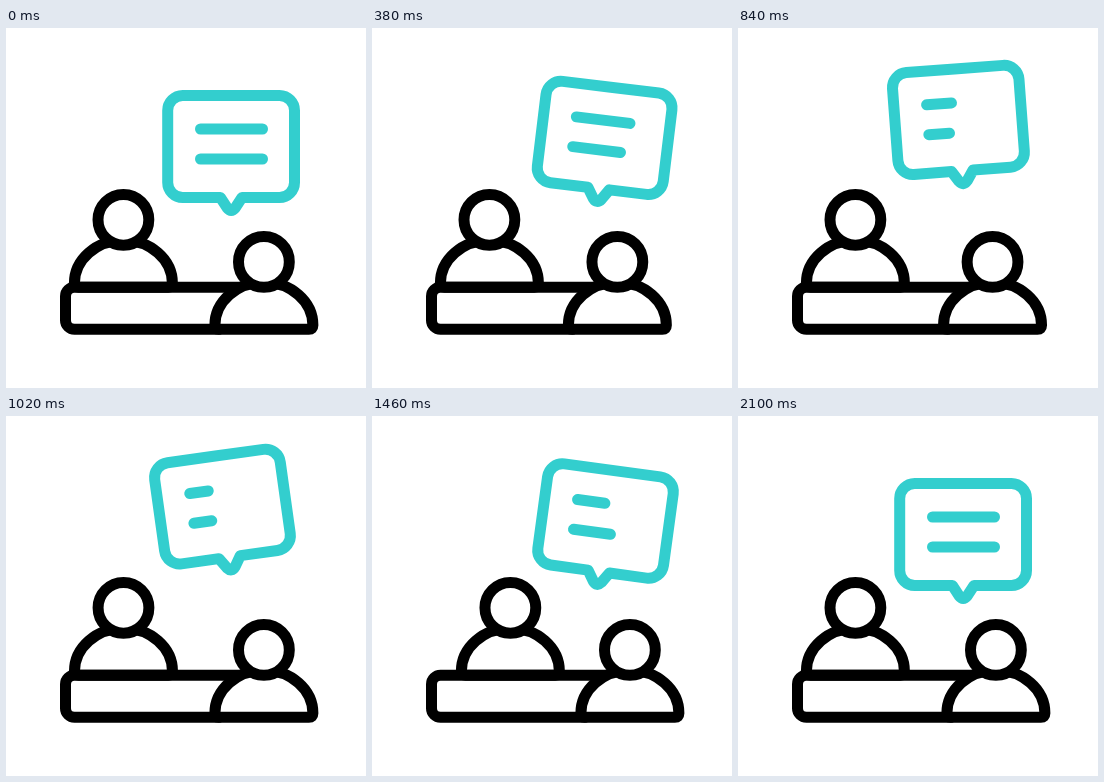
An HTML page with a canvas that plays this animation: 360 by 360 pixels, repeating every 2.52 s.

```html
<!DOCTYPE html>
<html lang="en">
<head>
<meta charset="utf-8">
<title>Conversation</title>
<style>
html, body { margin: 0; width: 100%; height: 100%; overflow: hidden; background: #fff; }
canvas { display: block; width: 360px; height: 360px; }
</style>
</head>
<body>
<canvas id="stage"></canvas>
<script>
const LOOP = 2520, STEP = 20;
const INK = '#000', TEAL = '#33cece';
const canvas = document.getElementById('stage');
const ctx = canvas.getContext('2d');
const scale = window.devicePixelRatio || 1;
canvas.width = canvas.height = 360 * scale;

// Cosine ease from 0 to 1 between a and b; skew > 0 runs ahead, < 0 lags
function ease(t, a, b, skew = 0) {
  const q = Math.min(1, Math.max(0, (t - a) / (b - a)));
  const u = q + skew * q * (1 - q);
  return (1 - Math.cos(Math.PI * u)) / 2;
}

// There and back again
const slide = (t, a, b) => ease(t, a, (a + b) / 2) - ease(t, (a + b) / 2, b);

function stroke(color) {
  ctx.strokeStyle = color;
  ctx.stroke();
}

function person(x, base) {
  ctx.fillStyle = '#fff';
  ctx.beginPath();
  ctx.ellipse(x, base - 4, 49, 43, 0, Math.PI, Math.PI * 2);
  ctx.quadraticCurveTo(x + 49, base, x + 45, base);
  ctx.lineTo(x - 45, base);
  ctx.quadraticCurveTo(x - 49, base, x - 49, base - 4);
  ctx.closePath();
  ctx.fill();
  stroke(INK);
  ctx.beginPath();
  ctx.arc(x, base - 67.4, 25.4, 0, Math.PI * 2);
  ctx.fill();
  stroke(INK);
}

function desk(right) {
  ctx.beginPath();
  ctx.moveTo(right - 24, 259.3);
  ctx.arcTo(59.5, 259.3, 59.5, 301.3, 9);
  ctx.arcTo(59.5, 301.3, right, 301.3, 9);
  ctx.lineTo(right - 45, 301.3);
  stroke(INK);
}

function textLine(y, length) {
  ctx.beginPath();
  ctx.moveTo(194.5, y);
  ctx.lineTo(194.5 + length, y);
  stroke(TEAL);
}

function bubble(t) {
  const lift = 28.5 * (ease(t, 0, 1000) - ease(t, 1000, 2000, 0.18));
  const tilt = 8 * ease(t, 0, 500) - 16 * ease(t, 500, 1000)
    + 16 * ease(t, 1000, 1500) - 8 * ease(t, 1500, 2000);
  ctx.save();
  ctx.translate(225.2, 181 - lift);
  ctx.rotate(tilt * Math.PI / 180);
  ctx.translate(-225.2, -181);

  ctx.beginPath();
  ctx.moveTo(225, 67.4);
  ctx.arcTo(288.5, 67.4, 288.5, 169.5, 15);
  ctx.arcTo(288.5, 169.5, 236, 169.5, 15);
  ctx.lineTo(236, 169.5);
  ctx.lineTo(229.3, 179.8);
  ctx.quadraticCurveTo(225.2, 185, 221.1, 179.8);
  ctx.lineTo(214.4, 169.5);
  ctx.arcTo(161.7, 169.5, 161.7, 67.4, 15);
  ctx.arcTo(161.7, 67.4, 225, 67.4, 15);
  ctx.closePath();
  stroke(TEAL);

  const first = ease(t, 100, 1100) - ease(t, 1100, 2100, -0.22);
  const second = slide(t, 0, 2000);
  textLine(101, 62 - 44 * first);
  textLine(131, 62 - 44 * second);
  ctx.restore();
}

function draw(t) {
  ctx.setTransform(scale, 0, 0, scale, 0, 0);
  ctx.fillStyle = '#fff';
  ctx.fillRect(0, 0, 360, 360);
  ctx.lineWidth = 11;
  ctx.lineCap = ctx.lineJoin = 'round';
  const front = 257.9 - 14.5 * slide(t, 0, 1000);
  const back = 117.4 + 21.3 * slide(t, 1000, 2000);
  person(back, 259.2);
  desk(front);
  person(front, 301.3);
  bubble(t);
}

const start = performance.now();
function frame() {
  const t = (performance.now() - start) % LOOP;
  draw(Math.floor(t / STEP) * STEP);
  requestAnimationFrame(frame);
}
frame();
</script>
</body>
</html>
```
